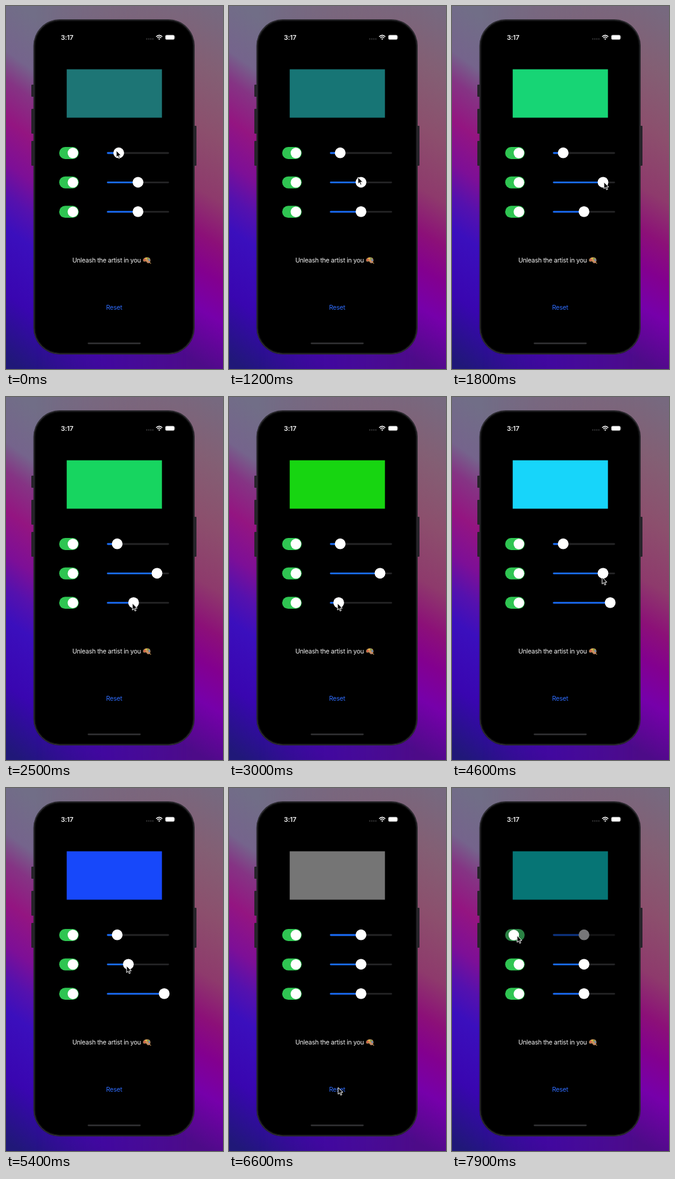
An HTML page for the animation above (8 s loop, 360 by 600 pixels).

```html
<!DOCTYPE html>
<html lang="en">
<head>
<meta charset="utf-8">
<title>Colour mixer</title>
<style>
  html, body { margin: 0; width: 100%; height: 100%; overflow: hidden; background: #000; }
  svg { display: block; width: 100vw; height: 100vh; }
  text { font: 400 10.5px Inter, sans-serif; letter-spacing: -.25px; fill: #f4f4f4; }
</style>
</head>
<body>
<svg viewBox="0 0 360 600">
  <defs>
    <linearGradient id="left" gradientUnits="userSpaceOnUse" x1="0" y1="0" x2="0" y2="600" gradientTransform="translate(0 -16) skewY(35)">
      <stop offset="0" stop-color="#716e87"/>
      <stop offset=".15" stop-color="#75648c"/>
      <stop offset=".23" stop-color="#853484"/>
      <stop offset=".34" stop-color="#941581"/>
      <stop offset=".46" stop-color="#7d0f97"/>
      <stop offset=".55" stop-color="#5511ae"/>
      <stop offset=".64" stop-color="#3b0fbd"/>
      <stop offset=".82" stop-color="#3906b0"/>
      <stop offset="1" stop-color="#201878"/>
    </linearGradient>
    <linearGradient id="right" gradientUnits="userSpaceOnUse" x1="0" y1="0" x2="0" y2="600" gradientTransform="translate(0 -194) skewY(30)">
      <stop offset="0" stop-color="#77697f"/>
      <stop offset=".17" stop-color="#835f74"/>
      <stop offset=".35" stop-color="#8c4f6d"/>
      <stop offset=".52" stop-color="#8e3a6c"/>
      <stop offset=".64" stop-color="#8c1078"/>
      <stop offset=".74" stop-color="#83008f"/>
      <stop offset=".85" stop-color="#7600aa"/>
      <stop offset="1" stop-color="#4d0b88"/>
    </linearGradient>
    <linearGradient id="fade" gradientUnits="userSpaceOnUse" x1="50" y1="0" x2="310" y2="0">
      <stop offset="0" stop-color="#000"/>
      <stop offset="1" stop-color="#fff"/>
    </linearGradient>
    <mask id="blend" maskUnits="userSpaceOnUse" x="0" y="0" width="360" height="600">
      <rect width="360" height="600" fill="url(#fade)"/>
    </mask>
  </defs>

  <rect width="360" height="600" fill="url(#left)"/>
  <rect width="360" height="600" fill="url(#right)" mask="url(#blend)"/>

  <!-- phone body -->
  <g fill="#26232a">
    <rect x="42" y="130" width="6" height="20" rx="1"/>
    <rect x="42" y="170" width="6" height="41" rx="1"/>
    <rect x="42" y="223" width="6" height="41" rx="1"/>
    <rect x="311" y="198" width="5" height="66" rx="1"/>
  </g>
  <rect x="45.5" y="22" width="267.5" height="554" rx="44" fill="#17161a"/>
  <rect x="46.7" y="23.2" width="265.1" height="551.6" rx="42.8" fill="#000" stroke="#343338" stroke-width="1.3"/>
  <rect x="48.4" y="24.9" width="261.7" height="548.2" rx="41" fill="#000" stroke="#121214"/>

  <!-- status bar -->
  <text x="91" y="55.6" style="font-size:11px;font-weight:600">3:17</text>
  <g fill="#48484a">
    <circle cx="233.6" cy="54.6" r="1"/><circle cx="237" cy="54.6" r="1"/>
    <circle cx="240.3" cy="54.6" r="1"/><circle cx="243.6" cy="54.6" r="1"/>
  </g>
  <g fill="none" stroke="#fff" stroke-width="1.5">
    <path d="M249.1 50.7Q254.2 46.1 259.3 50.7"/>
    <path d="M250.9 52.7Q254.2 49.7 257.5 52.7"/>
  </g>
  <path d="M252.5 54.1Q254.2 52.7 255.9 54.1L254.2 55.9Z" fill="#fff"/>
  <rect x="264.3" y="48" width="15.2" height="7.6" rx="2.3" fill="#fff" stroke="#777" stroke-width=".7"/>
  <path d="M280.6 50.5q1.3 1.3 0 2.6z" fill="#888"/>

  <rect id="swatch" x="100.7" y="104.6" width="158" height="80"/>
  <g id="rows"></g>

  <text x="110" y="424">Unleash the artist in you</text>
  <g transform="translate(227 414.5)">
    <path d="M6.3 .8C10.8.3 13.2 3.4 12.6 6.9C12.1 10.2 9 11.3 7.6 10.3C6.2 9.3 6.5 7.7 4.8 7.8C2.8 7.9.4 8.4.4 5.9C.4 3.1 3 1.2 6.3.8Z" fill="#bd8657"/>
    <circle cx="3" cy="5.2" r="1.2" fill="#e5473f"/>
    <circle cx="5.5" cy="2.8" r="1.2" fill="#f1c73d"/>
    <circle cx="8.8" cy="2.9" r="1.2" fill="#57b653"/>
    <circle cx="10.8" cy="5.4" r="1.2" fill="#428fe0"/>
    <circle cx="9.6" cy="8.4" r="1.2" fill="#8c52b9"/>
    <path d="M5.8 5.2L13.1 10.9" stroke="#d9a45c" stroke-width="1.1" stroke-linecap="round"/>
  </g>
  <text x="166" y="502.4" style="fill:#2f6dff">Reset</text>
  <rect x="135.5" y="556.2" width="88" height="2.8" rx="1.4" fill="#2f2f31"/>

  <path id="cursor" d="M0 0V11.2L2.6 8.8L4.3 12.8L6.2 12L4.5 8.1H8Z" fill="#080808" stroke="#fff" stroke-width="1" stroke-linejoin="round"/>
</svg>
<script>
const LOOP = 8000, STEP = 100;
const MID = 219, TRACK = 167.5, SPAN = 90;
const RESET = 6500, OFF = 7900;
const rowY = [243, 291.6, 340.2];

// each key: time, value; eased between neighbours
const knobKeys = [
  [[700, 187], [800, 184.5]],
  [[1300, MID], [1800, 250.5], [4600, 250.5], [5400, 203]],
  [[2300, MID], [3000, 182], [3200, 182], [4000, 262.5]]
];
// time, x, y
const cursorKeys = [
  [700, 183, 239], [800, 181, 239.5], [900, 181, 240], [1300, 220, 291], [1800, 252, 291],
  [1900, 252, 292], [2300, 217, 341], [3000, 180, 341], [3200, 180, 341], [4000, 261, 342],
  [4100, 261, 342], [4600, 249, 298], [5400, 200, 294], [5500, 200, 294],
  [6300, 181, 495], [6800, 181, 495], [7600, 108, 244]
];
const toggleKeys = [[7800, 111], [OFF, 102.5]];

const NS = "http://www.w3.org/2000/svg";
const set = (node, attrs) => { for (const k in attrs) node.setAttribute(k, attrs[k]); };
function add(parent, tag, attrs) {
  const node = parent.appendChild(document.createElementNS(NS, tag));
  set(node, attrs);
  return node;
}

function valueAt(keys, t, col = 1) {
  if (t <= keys[0][0]) return keys[0][col];
  for (let i = 1; i < keys.length; i++) {
    const a = keys[i - 1], b = keys[i];
    if (t <= b[0]) {
      const p = (t - a[0]) / (b[0] - a[0]);
      return a[col] + (b[col] - a[col]) * p * p * (3 - 2 * p);
    }
  }
  return keys[keys.length - 1][col];
}

function makeRow(y) {
  const g = document.getElementById("rows");
  const pill = add(g, "rect", { x: 88.2, y: y - 9.9, width: 32.4, height: 19.8, rx: 9.9, fill: "#2fc552" });
  const thumb = add(g, "circle", { cx: 111, cy: y, r: 8.7, fill: "#fff" });
  const slider = add(g, "g", {});
  add(slider, "rect", { x: TRACK, y: y - 1.4, width: 103, height: 2.8, rx: 1.4, fill: "#242426" });
  const fill = add(slider, "rect", { x: TRACK, y: y - 1.4, width: 50, height: 2.8, rx: 1.4, fill: "#176bf8" });
  const knob = add(slider, "circle", { cx: MID, cy: y - .3, r: 8.9, fill: "#fff" });
  return { pill, thumb, slider, fill, knob };
}

const rows = rowY.map(makeRow);
const swatch = document.getElementById("swatch");
const cursor = document.getElementById("cursor");

// display curve makes a half-way slider a little darker than linear
const channel = x => {
  const v = Math.min(1, Math.max(0, (x - MID) / SPAN + .5));
  return Math.round(255 * Math.pow(v, 1.12));
};

function draw(t) {
  const off = t >= OFF;
  const knobs = knobKeys.map(keys => t >= RESET ? MID : valueAt(keys, t));
  rows.forEach((row, i) => {
    set(row.knob, { cx: knobs[i] });
    set(row.fill, { width: knobs[i] - TRACK });
  });
  set(rows[0].thumb, { cx: valueAt(toggleKeys, t) });
  set(rows[0].pill, { fill: off ? "#2a8143" : "#2fc552" });
  set(rows[0].slider, { opacity: 1 });
  set(rows[0].knob, { fill: off ? "#777779" : "#fff" });
  set(rows[0].fill, { fill: off ? "#0c3485" : "#176bf8" });
  set(rows[0].slider.firstChild, { fill: off ? "#151516" : "#242426" });

  const rgb = knobs.map(channel);
  if (off) rgb[0] = 6;
  set(swatch, { fill: `rgb(${rgb})` });
  set(cursor, { transform: `translate(${valueAt(cursorKeys, t, 1)} ${valueAt(cursorKeys, t, 2)})` });
}

const start = performance.now();
function tick() {
  const t = (performance.now() - start) % LOOP;
  draw(Math.floor(t / STEP) * STEP);
  requestAnimationFrame(tick);
}
tick();
</script>
</body>
</html>
```
